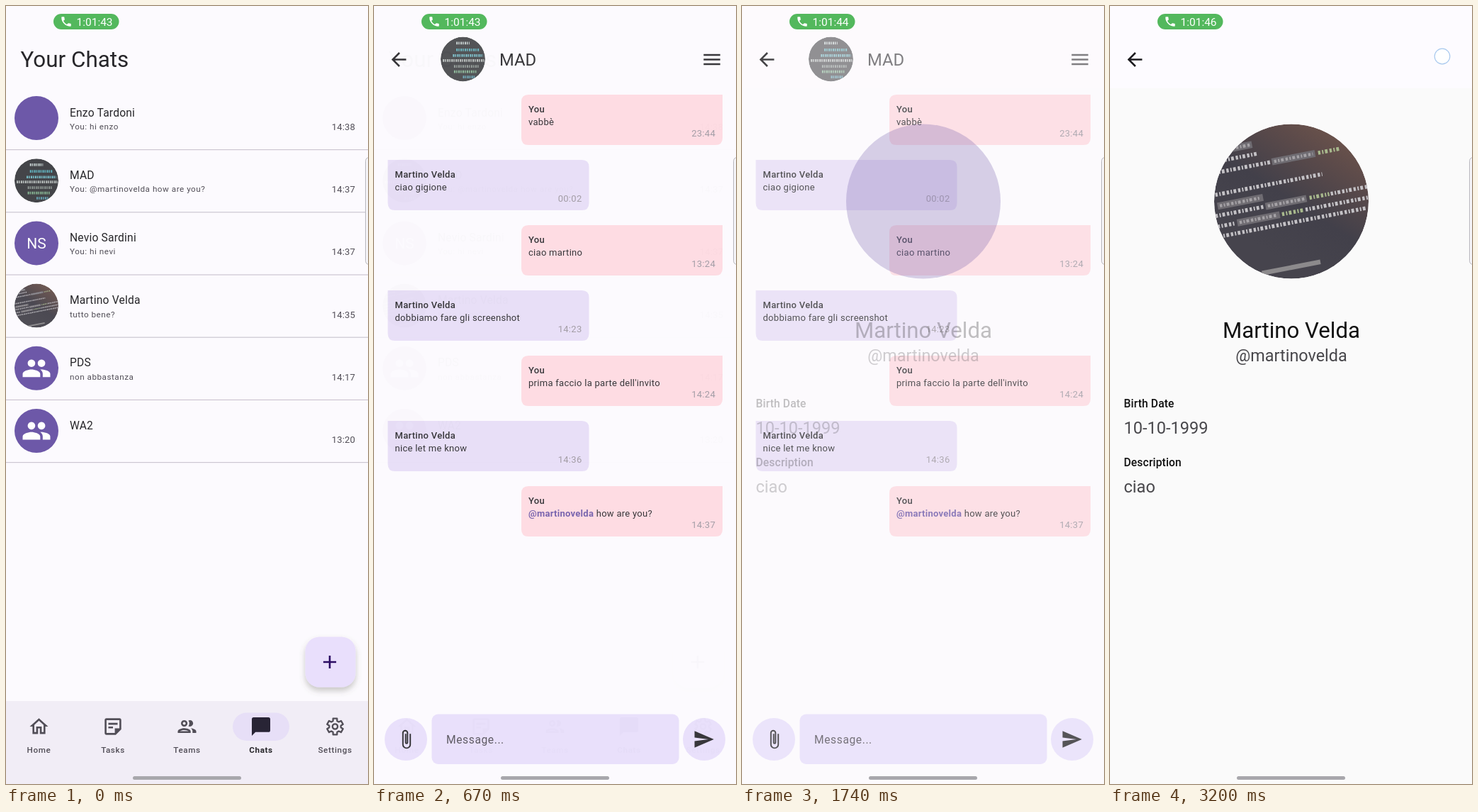
Write an HTML page that moves like this. It is 511 by 1097 pixels and loops after 3.33 s.

```html
<!DOCTYPE html>
<html lang="it">
<head>
<meta charset="utf-8">
<style>
  html, body { margin: 0; width: 100%; height: 100%; overflow: hidden; background: #fafafa; }
  svg { display: block; width: 511px; height: 1097px; font-family: Roboto, sans-serif; white-space: pre; }
</style>
</head>
<body>
<svg id="stage" viewBox="0 0 511 1097">
  <defs>
    <linearGradient id="desk" x1=".95" y1="0" x2=".4" y2=".85">
      <stop offset="0" stop-color="#75584c"/><stop offset=".3" stop-color="#5d4b4a"/>
      <stop offset=".65" stop-color="#42404a"/><stop offset="1" stop-color="#46444d"/>
    </linearGradient>
    <clipPath id="round"><circle r="1"/></clipPath>
    <filter id="shadow" x="-30%" y="-30%" width="160%" height="170%">
      <feDropShadow dx="0" dy="5" stdDeviation="4" flood-color="#554" flood-opacity=".32"/>
    </filter>
  </defs>
  <g id="list"></g>
  <g id="chat"></g>
  <g id="profile"></g>
  <g id="system"></g>
</svg>
<script>
const LOOP = 3330, FADE = 700;
const BG = '#fdfbff', PURPLE = '#6650a4', INK = '#1c1b1f', GREY = '#49454f', LILAC = '#e7ddfc';
const PERSON = 'Martino Velda', HANDLE = '@martinovelda';
const $ = id => document.getElementById(id);

const ICONS = {
  home: 'M12 5.7l5 4.5V18h-2v-6H9v6H7v-7.8zM12 3 2 12h3v8h6v-6h2v6h6v-8h3z',
  note: 'M19 5v9h-5v5H5V5zM19 3H5a2 2 0 0 0-2 2v14a2 2 0 0 0 2 2h10l6-6V5a2 2 0 0 0-2-2zM12 14H7v-2h5zM17 10H7V8h10z',
  team: 'M9 13.7c-2.3 0-7 1.2-7 3.5V19h14v-1.8c0-2.3-4.7-3.5-7-3.5zM4.3 17c2-1.6 7.3-1.6 9.4 0zM9 5a3.5 3.5 0 1 0 .01 0zM9 7a1.5 1.5 0 1 1-.01 0zM16 13.8c1.2.8 2 2 2 3.4V19h4v-1.8c0-2-3.5-3.1-6-3.4zM15 12a3.5 3.5 0 1 0-1.5-6.6q2 3.1 0 6.3a3.5 3.5 0 0 0 1.5.3z',
  bubble: 'M20 2H4a2 2 0 0 0-2 2v18l4-4h14a2 2 0 0 0 2-2V4a2 2 0 0 0-2-2z',
  group: 'M16 5a3 3 0 1 0 .01 0zM8 5a3 3 0 1 0 .01 0zM8 13c-2.3 0-7 1.2-7 3.5V19h14v-2.5C15 14.2 10.3 13 8 13zM15 13c1.2.9 2 2 2 3.5V19h6v-2.5C23 14 18 12.8 15 13z',
  back: 'M20 11H7.8l5.6-5.6L12 4l-8 8 8 8 1.4-1.4L7.8 13H20z',
  menu: 'M3 18h18v-2H3zM3 13h18v-2H3zM3 6v2h18V6z',
  plus: 'M19 13h-6v6h-2v-6H5v-2h6V5h2v6h6z',
  send: 'M2 21l21-9L2 3v7l15 2-15 2z',
  phone: 'M6.6 10.8q2.2 4.4 6.6 6.6l2.2-2.2q.5-.5 1-.3 1.7.6 3.6.6 1 0 1 1V20q0 1-1 1A17 17 0 0 1 3 4q0-1 1-1h3.5q1 0 1 1 0 1.9.6 3.6.2.5-.3 1z'
};

const gear = () => {
  const points = [];
  for (let tooth = 0; tooth < 6; tooth++)
    for (const [r, turn] of [[6.4, -.36], [9, -.24], [9, .24], [6.4, .36]]) {
      const a = tooth * Math.PI / 3 + turn - Math.PI / 2;
      points.push([12 + r * Math.cos(a), 12 + r * Math.sin(a)].map(v => v.toFixed(2)));
    }
  return `<g fill="none" stroke="${GREY}" stroke-width="1.8" stroke-linejoin="round"><polygon points="${points.join(' ')}"/><circle cx="12" cy="12" r="2.8"/></g>`;
};

const place = (x, y, scale, body) =>
  `<g transform="translate(${x} ${y}) scale(${scale}) translate(-12 -12)">${body}</g>`;
const icon = (name, x, y, fill = INK, scale = 1.3) =>
  place(x, y, scale, `<path d="${ICONS[name]}" fill="${fill}" fill-rule="evenodd"/>`);
const rect = (x, y, w, h, fill, r = 0, more = '') =>
  `<rect x="${x}" y="${y}" width="${w}" height="${h}" fill="${fill}" rx="${r}" ${more}/>`;
const disc = (x, y, r, fill, more = '') => `<circle cx="${x}" cy="${y}" r="${r}" fill="${fill}" ${more}/>`;
const text = (str, x, y, size, { fill = INK, spacing = 0, weight = 400, anchor = 'start', id = '' } = {}) =>
  `<text id="${id}" x="${x}" y="${y}" font-size="${size}" fill="${fill}" letter-spacing="${spacing}" font-weight="${weight}" text-anchor="${anchor}">${str}</text>`;
const bar = (y, x1, x2, color, width, dash = '') =>
  `<path d="M${x1} ${y}H${x2}" stroke="${color}" stroke-width="${width}" stroke-dasharray="${dash}"/>`;

const photo = (x, y, r, tilt, base, body) =>
  `<g transform="translate(${x} ${y}) scale(${r})"><g clip-path="url(#round)">${disc(0, 0, 1, base)}<g transform="rotate(${tilt})">${body}</g></g></g>`;

// Short dashes read as blurred letters
const LETTERS = '.03 .022 .018 .02 .035 .025';

const tiltedCode = (x, y, r) => photo(x, y, r, -11, 'url(#desk)',
  [[-.69, -.75, -.3], [-.55, -.9, -.17], [-.27, -.95, .46], [0, -1, -.36], [0, .52, 1],
   [.14, -1, -.76], [.14, .16, 1], [.27, -1, .95]]
    .map(([y, a, b]) => bar(y, a, b, '#c4c2c6', .05, LETTERS)).join('') +
  [[-.82, -.75, -.36], [-.55, -.15, .42], [-.12, -.95, -.35], [0, -.34, .2], [.14, -.74, -.18]]
    .map(([y, a, b]) => bar(y, a, b, '#6f6c72', .09) + bar(y, a + .03, b - .03, '#a5a2a6', .04, LETTERS)).join('') +
  [[-.55, .46, .75], [0, .24, .5], [.14, -.15, .13]]
    .map(([y, a, b]) => bar(y, a, b, '#a8b98d', .05, LETTERS)).join('') +
  bar(.84, -.55, .22, '#8c8a8c', .06));

const flatCode = (x, y, r) => photo(x, y, r, 0, '#3b3c40',
  [[-.72, -.3, .3, '#b9c4c4'], [-.42, -.3, .75, '#58a9b5'], [-.16, -.45, .9, '#6fb8c4'],
   [.06, -.9, .95, '#b4bab8'], [.32, -.4, .7, '#87908c'], [.56, -.4, .6, '#7fae8c'], [.8, 0, .55, '#5d9cac']]
    .map(([y, a, b, c]) => bar(y, a, b, c, .12, '.07 .03 .05 .04')).join(''));

const groupAvatar = (x, y) => disc(x, y, 31, PURPLE) + icon('group', x, y, '#fff', 1.77);

function listScreen() {
  const rows = [
    ['Enzo Tardoni', 'You: hi enzo', '14:38', (x, y) => disc(x, y, 31, PURPLE)],
    ['MAD', `You: ${HANDLE} how are you?`, '14:37', (x, y) => flatCode(x, y, 31)],
    ['Nevio Sardini', 'You: hi nevi', '14:37', (x, y) => disc(x, y, 31, PURPLE) +
      text('NS', x, y + 7.5, 21, { fill: '#fff', anchor: 'middle' })],
    [PERSON, 'tutto bene?', '14:35', (x, y) => tiltedCode(x, y, 31)],
    ['PDS', 'non abbastanza', '14:17', groupAvatar],
    ['WA2', '', '13:20', groupAvatar]
  ];
  const tabs = ['Home', 'Tasks', 'Teams', 'Chats', 'Settings'], glyphs = ['home', 'note', 'team', 'bubble'];
  return rect(0, 0, 511, 1097, BG) + text('Your Chats', 20.5, 86, 31.4) +
    rows.map(([name, last, time, avatar], i) => {
      const y = 158 + i * 88.2;
      return avatar(43, y) + text(name, 90, y - 2.5, 15.6, { spacing: .2 }) +
        text(last, 90, y + 16, 11.7, { fill: GREY, spacing: .52 }) +
        text(time, 493, y + 17, 13, { fill: GREY, spacing: .2, anchor: 'end' }) +
        rect(0, y + 44, 511, 1.2, '#cac4d0');
    }).join('') +
    rect(422.5, 889.5, 71, 71, '#e9defd', 20, 'filter="url(#shadow)"') + icon('plus', 457, 925, '#21005d') +
    rect(0, 980, 511, 117, '#f1edf6') + rect(320, 996.5, 80, 39.5, '#e6def7', 19.7) +
    tabs.map((label, i) => {
      const x = 46.5 + i * 104.5, active = i === 3;
      return (i < 4 ? icon(glyphs[i], x, 1016, active ? '#1d192b' : GREY) : place(x, 1016, 1.3, gear())) +
        text(label, x, 1053, 11.7, { fill: active ? INK : GREY, spacing: .6, weight: active ? 700 : 500, anchor: 'middle' });
    }).join('');
}

function bubble([message, time], i) {
  const mine = i % 2 === 0, x = mine ? 208 : 19.5, y = 125 + i * 92, pad = x + 10;
  const shape = mine
    ? `M${x + 10} ${y}h274v61q0 10-10 10h-264q-10 0-10-10v-51q0-10 10-10z`
    : `M${x} ${y}h274q10 0 10 10v51q0 10-10 10h-264q-10 0-10-10z`;
  return `<path d="${shape}" fill="${mine ? '#ffd8e0' : '#e6dcf7'}"/>` +
    text(mine ? 'You' : PERSON, pad, y + 24.5, 13, { spacing: .3, weight: 500 }) +
    text(message, pad, y + 42.5, 13, { spacing: .28 }) +
    text(time, x + 274, y + 58.5, 13, { fill: '#97909a', spacing: .3, anchor: 'end' });
}

function chatScreen() {
  const messages = [
    ['vabbè', '23:44'], ['ciao gigione', '00:02'], ['ciao martino', '13:24'],
    ['dobbiamo fare gli screenshot', '14:23'], ["prima faccio la parte dell'invito", '14:24'],
    ['nice let me know', '14:36'],
    [`<tspan fill="${PURPLE}" font-weight="700">${HANDLE}</tspan> how are you?`, '14:37']
  ];
  const clip = 'M16.5 6v11.5a4 4 0 0 1-8 0V5a2.5 2.5 0 0 1 5 0v10.5a1 1 0 0 1-2 0V6';
  return rect(0, 0, 511, 1097, BG) + icon('back', 35, 75.5) +
    `<g id="chatPhoto">${flatCode(125.5, 75, 31.5)}</g>` + disc(125.5, 75, 31.5, PURPLE, 'id="chatBlank"') +
    text('MAD', 177, 84, 23.8) + icon('menu', 477, 75.5) +
    messages.map(bubble).join('') +
    disc(45, 1034, 30, LILAC) + rect(81.5, 998.5, 349, 70.5, LILAC, 9) + disc(466, 1034, 30, LILAC) +
    place(46, 1034, 1.3, `<path d="${clip}" transform="translate(-.5 0)" fill="none" stroke="${INK}" stroke-width="1.5"/>`) +
    text('Message...', 102, 1040, 15.6, { fill: GREY, spacing: .6 }) + icon('send', 465.5, 1034);
}

function profileScreen() {
  const soft = { fill: '#48474b' }, label = { fill: '#111', weight: 500, spacing: .15 };
  return rect(0, 0, 511, 116, BG) + icon('back', 35, 75.5) +
    `<g id="profilePhoto">${tiltedCode(256, 275.5, 109)}</g>` + disc(256, 275.5, 109, PURPLE, 'id="profileBlank"') +
    text(PERSON, 256, 467.5, 31.2, { fill: '#111', anchor: 'middle' }) +
    text(HANDLE, 256, 500.5, 23.4, { ...soft, anchor: 'middle' }) +
    text('Birth Date', 19.5, 566, 15.6, label) + text('10-10-1999', 19.5, 603, 23.6, soft) +
    text('Description', 19.5, 648.5, 15.6, label) + text('ciao', 19.5, 685.5, 23.6, soft);
}

function systemLayer() {
  return rect(67, 11, 92.5, 22, '#53b85d', 11) + icon('phone', 85, 22, '#fff', .75) +
    text('', 99.5, 27.5, 15.5, { fill: '#fff', id: 'clock' }) +
    rect(179, 1086, 153, 5, '#a8a7ac', 2.5) +
    rect(507.5, 213.5, 12, 151, '#f5f4f8', 5, 'stroke="#b9b8be"') +
    disc(469, 71, 10.8, '#fff', 'id="touch" stroke="#a9c9ee" stroke-width="1.2"');
}

// Standard fast-out-slow-in curve, cubic-bezier(.4, 0, .2, 1)
function ease(x) {
  if (x <= 0) return 0;
  if (x >= 1) return 1;
  let low = 0, high = 1, u;
  for (let i = 0; i < 20; i++) {
    u = (low + high) / 2;
    const at = 1.2 * u * (1 - u) ** 2 + .6 * u * u * (1 - u) + u ** 3;
    if (at < x) low = u; else high = u;
  }
  return u * u * (3 - 2 * u);
}

$('list').innerHTML = listScreen();
$('chat').innerHTML = chatScreen();
$('profile').innerHTML = profileScreen();
$('system').innerHTML = systemLayer();

const show = (id, visible) => $(id).setAttribute('display', visible ? 'inline' : 'none');
const fade = (id, alpha) => { $(id).setAttribute('opacity', alpha); show(id, alpha > 0); };

function draw(t) {
  const toList = ease((t + 504) / FADE), toChat = ease((t - 255) / FADE), toProfile = ease((t - 1560) / FADE);
  fade('list', toList * (1 - toChat));
  fade('chat', toChat * (1 - toProfile));
  fade('profile', toProfile);
  show('chatPhoto', t >= 500);
  show('chatBlank', t < 500);
  show('profilePhoto', t >= 1900);
  show('profileBlank', t < 1900);
  show('touch', t >= 3200);
  $('clock').textContent = '1:01:' + (43 + Math.floor(Math.max(0, t - 20) / 1000));
}

const start = performance.now();
function tick() {
  draw((performance.now() - start) % LOOP);
  requestAnimationFrame(tick);
}
tick();
</script>
</body>
</html>
```
